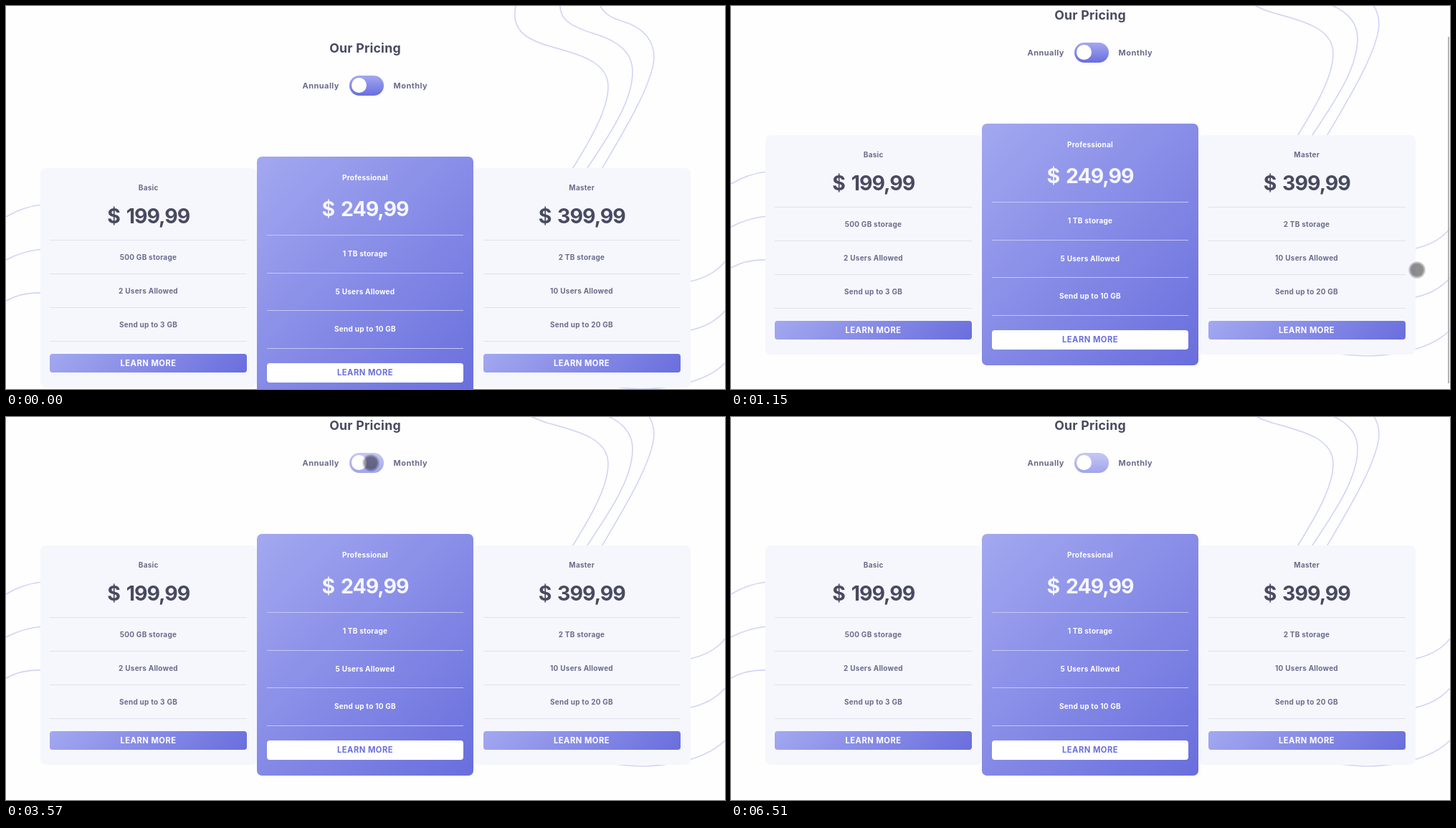
An HTML page that plays this animation: 1003 px wide and 534 px high, repeating every 7.17 s.

```html
<!DOCTYPE html>
<html lang="en">
<head>
<meta charset="utf-8">
<title>Pricing</title>
<style>
:root {
  --loop: 7170ms;
  --fade: #a3a8f0, #696edd;
  --text: #6a6c8b;
  --dark: #484a60;
}
* { box-sizing: border-box; margin: 0; padding: 0; }
html, body { width: 100%; height: 100%; overflow: hidden; background: #fefefe; }
body { position: relative; font: 700 10px Inter, "Open Sans", sans-serif; color: var(--text); }
ul { list-style: none; }

.page, .page > *, .card > *, .price b { position: absolute; }
.page { left: 0; top: 0; width: 1003px; height: 600px; animation: scroll var(--loop) step-end infinite; }
.lines { left: 0; top: 0; fill: none; stroke: #d2d4f7; stroke-width: 1.6; }

h1 { left: 401px; top: 44px; width: 200px; text-align: center; font: 700 17.7px/30px Inter, "Open Sans", sans-serif; letter-spacing: .25px; color: var(--dark); }
.label { top: 96px; font-size: 11px; line-height: 30px; letter-spacing: .45px; white-space: nowrap; }
.track { left: 478.5px; top: 97px; width: 48.5px; height: 28px; border-radius: 14px; background: linear-gradient(var(--fade)); animation: focus var(--loop) step-end infinite; }
.knob { left: 481.5px; top: 100px; width: 21px; height: 21px; border-radius: 50%; background: #fff; animation: flip var(--loop) linear infinite; }

.card { top: 225.5px; width: 302.5px; height: 306px; border-radius: 7px; background: #f6f7fd; text-align: center; letter-spacing: .25px; }
.card h2 { left: 0; top: 12px; width: 100%; font-size: 10px; line-height: 30px; }
.price { left: 0; top: 47.5px; width: 100%; height: 40px; font-size: 28.5px; line-height: 40px; letter-spacing: -1px; word-spacing: 3px; color: var(--dark); white-space: pre; }
.price b { inset: 0; }
.year { animation: year var(--loop) step-end infinite; }
.month { animation: month var(--loop) step-end infinite; }
.card ul { left: 13.5px; top: 100.5px; width: 275px; border-bottom: 1px solid var(--rule, #e0e1ea); }
.card li { height: var(--row, 47px); line-height: calc(var(--row, 47px) - 1px); border-top: 1px solid var(--rule, #e0e1ea); }
.button { left: 13.5px; top: 259px; width: 275px; height: 26.5px; border-radius: 4px; background: linear-gradient(135deg, var(--fade)); color: #fff; font-size: 11.2px; line-height: 26px; letter-spacing: .5px; }

.main { --row: 52.6px; --rule: #c5c7f2; top: 210px; width: 302px; height: 336.5px; background: linear-gradient(135deg, var(--fade)); color: #fff; }
.main h2 { top: 13.5px; }
.main .price { top: 52.5px; color: #f6f7fd; }
.main ul { left: 14px; top: 109px; width: 274px; }
.main .button { left: 14px; top: 288px; width: 274px; height: 27px; line-height: 27px; background: #fff; color: #696edd; }

.bar { position: absolute; left: 1000px; top: 0; width: 2px; height: 483px; background: #b3b3b3; animation: bar var(--loop) step-end infinite; }
.cursor { position: absolute; left: -11.5px; top: -11.5px; width: 23px; height: 23px; border-radius: 50%; border: 2px solid rgba(0, 0, 0, .25); background: rgba(0, 0, 0, .44) padding-box; animation: move var(--loop) linear infinite, show var(--loop) step-end infinite; }

@keyframes scroll {
  0% { transform: none; }
  14.086% { transform: translateY(-6px); }
  15.06% { transform: translateY(-28px); }
  16.039% { transform: translateY(-46px); }
  16.87%, 100% { transform: translateY(-47px); }
}
@keyframes bar {
  0% { opacity: 0; transform: translateY(0); }
  14.086% { opacity: 1; transform: translateY(6px); }
  15.06% { opacity: 1; transform: translateY(26px); }
  16.039% { opacity: 1; transform: translateY(43px); }
  16.87% { opacity: 1; transform: translateY(44px); }
  20.64% { opacity: .85; transform: translateY(44px); animation-timing-function: linear; }
  23.57%, 100% { opacity: 0; transform: translateY(44px); }
}
@keyframes focus {
  0% { opacity: 1; }
  49.79%, 100% { opacity: .62; }
}
@keyframes flip {
  0% { transform: none; }
  50.35% { transform: none; animation-timing-function: ease; }
  56.76% { transform: translateX(21.5px); }
  68.34% { transform: translateX(21.5px); animation-timing-function: ease; }
  75.3%, 100% { transform: none; }
}
@keyframes year {
  0% { opacity: 1; }
  50.767% { opacity: 0; }
  68.75%, 100% { opacity: 1; }
}
@keyframes month {
  0% { opacity: 0; }
  50.767% { opacity: 1; }
  68.75%, 100% { opacity: 0; }
}
@keyframes show {
  0% { opacity: 0; }
  5.43% { opacity: 1; }
  90.79%, 100% { opacity: 0; }
}
@keyframes move {
  0%, 5.43% { transform: translate(998px, 500px); animation-timing-function: ease-out; }
  13.1%, 22.2% { transform: translate(956.5px, 367.5px); animation-timing-function: ease-in; }
  27.6% { transform: translate(800px, 260px); }
  31.93% { transform: translate(599px, 122px); animation-timing-function: step-end; }
  32.91% { transform: translate(550.5px, 90.5px); animation-timing-function: step-end; }
  33.89% { transform: translate(531px, 77px); animation-timing-function: step-end; }
  34.86% { transform: translate(521px, 70px); animation-timing-function: step-end; }
  35.84% { transform: translate(517px, 67px); animation-timing-function: step-end; }
  36.82% { transform: translate(515.5px, 65.5px); animation-timing-function: step-end; }
  39.6% { transform: translate(511px, 64px); animation-timing-function: step-end; }
  40.58%, 81.4% { transform: translate(508.5px, 63.5px); animation-timing-function: ease-in; }
  82.98% { transform: translate(549px, 97px); }
  83.96% { transform: translate(597px, 128px); }
  85.36% { transform: translate(690px, 180px); }
  89.82%, 100% { transform: translate(997px, 503px); }
}
</style>
</head>
<body>
<main class="page">
  <svg class="lines" width="1003" height="600">
    <path d="M711 0C705 30 720 45 758 56C800 67 840 78 840 112C840 145 815 187 789 229"/>
    <path d="M773 0C773 22 795 31 825 40C855 50 874 65 874 92C874 135 838 185 809 229"/>
    <path d="M829 0C837 15 850 18 868 24C890 33 904 48 904 72C902 110 860 178 830 229"/>
    <path d="M0 294C15 285 30 279 50 277"/>
    <path d="M0 354C15 346 30 341 50 339"/>
    <path d="M0 411C15 403 30 399 50 400"/>
    <path d="M950 385C972 381 992 371 1003 356"/>
    <path d="M950 453C972 449 990 440 1003 425"/>
    <path d="M845 530C895 539 968 532 1003 498"/>
  </svg>

  <h1>Our Pricing</h1>
  <span class="label" style="left:413.5px">Annually</span>
  <span class="label" style="left:540.5px">Monthly</span>
  <div class="track"></div>
  <div class="knob"></div>

  <section class="card" style="left:47.5px">
    <h2>Basic</h2>
    <p class="price"><b class="year">$ 199,99</b><b class="month">$ 19,99</b></p>
    <ul><li>500 GB storage</li><li>2 Users Allowed</li><li>Send up to 3 GB</li></ul>
    <div class="button">LEARN MORE</div>
  </section>
  <section class="card" style="left:652px">
    <h2>Master</h2>
    <p class="price"><b class="year">$ 399,99</b><b class="month">$ 39,99</b></p>
    <ul><li>2 TB storage</li><li>10 Users Allowed</li><li>Send up to 20 GB</li></ul>
    <div class="button">LEARN MORE</div>
  </section>
  <section class="card main" style="left:350px">
    <h2>Professional</h2>
    <p class="price"><b class="year">$ 249,99</b><b class="month">$ 24,99</b></p>
    <ul><li>1 TB storage</li><li>5 Users Allowed</li><li>Send up to 10 GB</li></ul>
    <div class="button">LEARN MORE</div>
  </section>
</main>
<div class="bar"></div>
<div class="cursor"></div>
</body>
</html>
```
